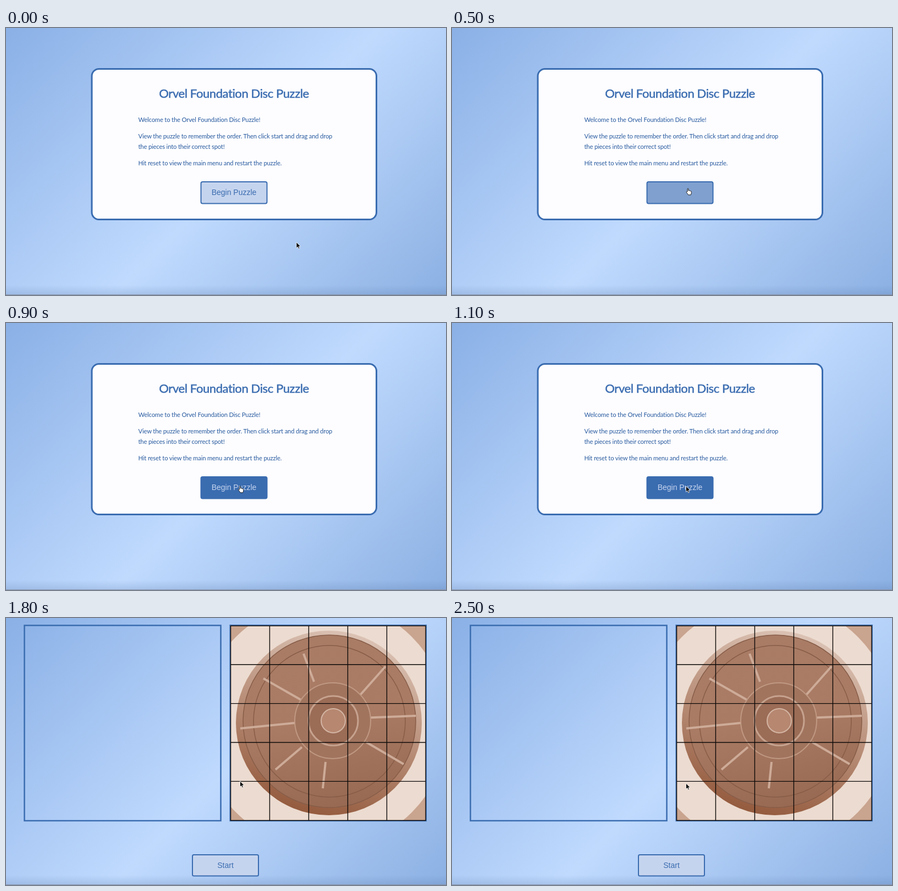
Animation, 800 px wide and 486 px high, one loop 2.6 s. Source, as an HTML page:

```html
<!DOCTYPE html>
<html lang="en">
<head>
<meta charset="utf-8">
<title>Disc Puzzle</title>
<style>
  html, body { margin: 0; width: 100%; height: 100%; overflow: hidden; }
  svg { display: block; width: 800px; height: 486px; }
  .copy { font: 11.2px Lato, sans-serif; letter-spacing: -.15px; fill: #285a9f; }
  .title { font: 22px Lato, sans-serif; letter-spacing: -.4px; fill: #3a6cb0; stroke: #3a6cb0; stroke-width: .5px; }
  .label { font: 14px "Liberation Sans", Arial, sans-serif; fill: #3a6cb0; }
  .title, .label { text-anchor: middle; }
  .frame { fill: none; stroke: #3a6cb0; }
  .button { fill: #c5d4ee; stroke: #3a6cb0; stroke-width: 2; }
</style>
</head>
<body>
<svg viewBox="0 0 800 486">
  <defs>
    <linearGradient id="sky" gradientUnits="userSpaceOnUse" x2="643" y2="643">
      <stop stop-color="#8ab0e6"/>
      <stop offset=".53" stop-color="#c0dafe"/>
      <stop offset="1" stop-color="#8bb0e3"/>
    </linearGradient>
    <linearGradient id="shade" x2="0" y2="1">
      <stop stop-color="#5878a8" stop-opacity="0"/>
      <stop offset="1" stop-color="#5878a8" stop-opacity=".22"/>
    </linearGradient>
    <linearGradient id="rim" x1=".65" y1="0" x2=".35" y2="1">
      <stop stop-color="#dcc4b6"/>
      <stop offset=".5" stop-color="#b98f79"/>
      <stop offset="1" stop-color="#93593c"/>
    </linearGradient>
    <linearGradient id="copper" x1=".3" y1="0" x2=".5" y2="1">
      <stop stop-color="#a97c66"/>
      <stop offset=".5" stop-color="#aa7b64"/>
      <stop offset="1" stop-color="#986a53"/>
    </linearGradient>
    <clipPath id="tiles"><path d="M408 14h355v355h-355z"/></clipPath>
  </defs>

  <path d="M0 0h800v486H0z" fill="url(#sky)"/>

  <g id="menu">
    <rect x="156" y="74.5" width="517.5" height="274" rx="13" fill="#fdfdff" stroke="#3a6cb0" stroke-width="3"/>
    <text class="title" x="414.5" y="127">Orvel Foundation Disc Puzzle</text>
    <g class="copy">
      <text x="240.5" y="171">Welcome to the Orvel Foundation Disc Puzzle!</text>
      <text x="240.5" y="201">View the puzzle to remember the order. Then click start and drag and drop</text>
      <text x="240.5" y="220">the pieces into their correct spot!</text>
      <text x="240.5" y="250">Hit reset to view the main menu and restart the puzzle.</text>
    </g>
    <rect id="begin" class="button" x="354.5" y="280" width="120" height="39.5" rx="3"/>
    <text id="beginLabel" class="label" x="414.5" y="304">Begin Puzzle</text>
  </g>

  <g id="game">
    <path class="frame" stroke-width="2.5" d="M33.5 13.5h357v355.5h-357z"/>
    <g clip-path="url(#tiles)">
      <path d="M408 14h355v355h-355z" fill="#c9a48f"/>
      <circle cx="578" cy="194" r="226" fill="#ecdbd0"/>
      <ellipse cx="587" cy="191" rx="169" ry="168" fill="url(#rim)"/>
      <circle cx="588" cy="188" r="157" fill="url(#copper)"/>
      <g fill="none" stroke="#875d48" stroke-width="1.5">
        <circle cx="588" cy="188" r="157"/>
        <circle cx="588" cy="188" r="138"/>
      </g>
      <path d="M468 110L538 150M541 65l19 51M645 182l100-4M490 276l48-41M655 226l68 40M581 262l-5 48M426 201l118-12M690 88l-46 52"
        stroke="#cdab98" stroke-width="4"/>
      <circle cx="594" cy="187" r="69" fill="#a1745e" stroke="#c09983" stroke-width="2"/>
      <circle cx="595" cy="187" r="45" fill="#9b6c56" stroke="#c6a28e" stroke-width="3"/>
      <circle cx="595" cy="187" r="22" fill="#b78770" stroke="#d3b5a3" stroke-width="2"/>
    </g>
    <path class="frame" stroke-width="1.5" d="M407.2 12.8h357v356.6h-357z"/>
    <path id="grid" fill="none" stroke="#0b0908" stroke-width="1.4"/>
    <rect class="button" x="339" y="431" width="120" height="38.5" rx="2.5"/>
    <text class="label" x="399" y="455">Start</text>
  </g>

  <path d="M0 468h800v17H0z" fill="url(#shade)"/>
  <path d="M0 485h800v1H0z" fill="#8792a8"/>

  <path id="arrow" d="M0 0V10.5L2.5 8.3 4.1 12 5.9 11.2 4.3 7.7H7.6Z" fill="#000" stroke="#fff" stroke-width=".8"/>
  <path id="hand" d="M2.6 6.6V1.4Q2.7.4 3.6.5 4.4.6 4.4 1.5V4.4Q5.6 3.8 6.2 4.8 7.3 4.3 7.9 5.2 9.6 4.9 9.7 6.6V8.8Q9.5 10.5 8.6 12.3H4.1Q2.9 10.3.8 7.6.3 6.6 1.1 6.3 1.8 6.1 2.6 6.6Z"
    fill="#fff" stroke="#111" stroke-width=".9" stroke-linejoin="round"/>
</svg>
<script>
const LOOP = 2600, STEP = 100;
const $ = id => document.getElementById(id);
const progress = (t, from, to) => Math.min(1, Math.max(0, (t - from) / (to - from)));
const ease = p => p * p * (3 - 2 * p);
const mix = (a, b, p) => a + (b - a) * p;
const blend = (a, b, p) => `rgb(${a.map((v, i) => Math.round(mix(v, b[i], p)))})`;
const show = (id, on) => $(id).style.display = on ? '' : 'none';

const PALE = [197, 212, 238], BLUE = [58, 108, 176];

let lines = 'M408.5 14.2h354.5v354.3h-354.5z';
for (let i = 1; i < 5; i++) lines += `M${408.4 + 71 * i} 14v355M408 ${13.8 + 70.9 * i}h355`;
$('grid').setAttribute('d', lines);

function pointer(t) {
  if (t < 700) {
    const p = ease(progress(t, 100, 450));
    return [mix(528, 425.5, p), mix(390, 291.5, p)];
  }
  if (t < 1000) {
    const p = progress(t, 700, 900);
    return [mix(425.5, 422, p), mix(291.5, 296.5, p)];
  }
  return [425.5, mix(297, 301, progress(t, 1900, 2200))];
}

function draw(now) {
  const t = Math.floor(Math.max(0, now - start) % LOOP / STEP) * STEP;
  const playing = t >= 1200;
  const hover = ease(progress(t, 350, 650));
  const overButton = t >= 400 && t < 1000;
  const [x, y] = pointer(t);

  show('menu', !playing);
  show('game', playing);
  $('begin').style.fill = blend(PALE, BLUE, hover);
  $('beginLabel').style.fill = blend(BLUE, PALE, hover);

  show('hand', overButton);
  show('arrow', !overButton);
  $(overButton ? 'hand' : 'arrow').setAttribute('transform', `translate(${x} ${y})`);
  requestAnimationFrame(draw);
}

const start = performance.now();
draw(start);
</script>
</body>
</html>
```
